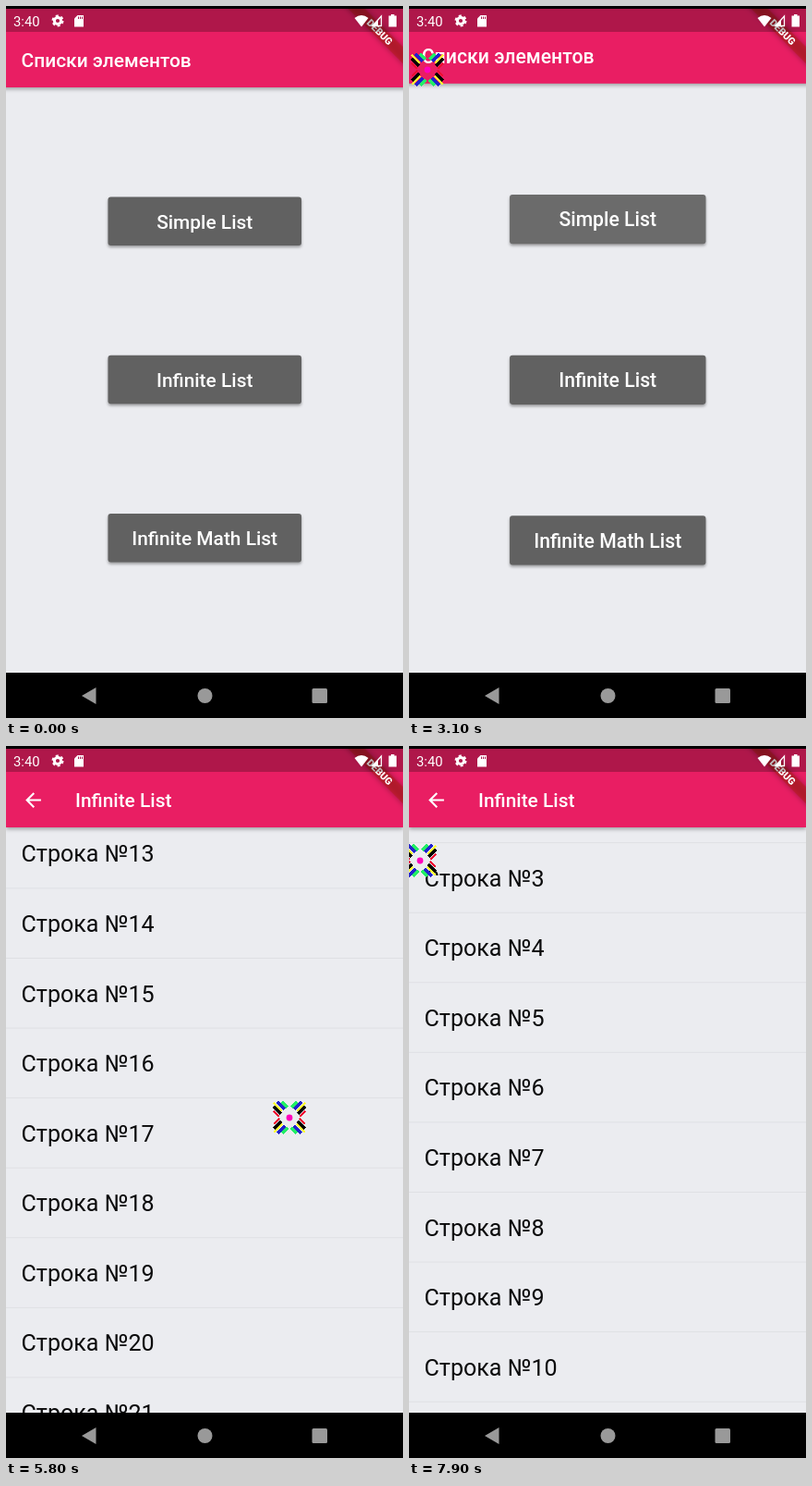
Recreate the animation shown at these times as an HTML page. Size 430 by 770 pixels, loop 8000 ms.

```html
<!DOCTYPE html>
<html lang="ru">
<head>
<meta charset="utf-8">
<title>Списки элементов</title>
<style>
html, body { margin: 0; width: 100%; height: 100%; overflow: hidden; background: #000; }
svg { display: block; width: 430px; height: 770px; font-family: Roboto, sans-serif; }
.title, .label { font-size: 20.9px; font-weight: 500; fill: #fff; }
.label { text-anchor: middle; }
.row { font-size: 25.08px; fill: #0b0b0c; }
.bar { fill: #e91e63; filter: drop-shadow(0 2px 2px rgba(0,0,0,.32)); }
.button { fill: #616161; filter: drop-shadow(0 2px 1.5px rgba(0,0,0,.35)); }
.page { transform-origin: 215px 387px; }
</style>
</head>
<body>
<svg viewBox="0 0 430 770">
  <defs>
    <clipPath id="body"><rect y="88" width="430" height="633"/></clipPath>
    <g id="corner" fill="none" shape-rendering="crispEdges">
      <path d="M0 1L9 10" stroke="#ff3" stroke-width="2.5"/>
      <path d="M4 0L12 8" stroke="#22c" stroke-width="3"/>
      <path d="M9 0L15 6" stroke="#2e6" stroke-width="3"/>
      <path d="M0 5L8 13" stroke="#000" stroke-width="3.5"/>
      <path d="M0 10L6 16" stroke="#e13" stroke-width="2.5"/>
    </g>
  </defs>

  <g id="home" class="page">
    <rect y="3" width="430" height="718" fill="#ebecf0"/>
    <g id="buttons"></g>
    <rect class="bar" x="-6" y="-3" width="442" height="91"/>
    <text class="title" x="16.5" y="66">Списки элементов</text>
  </g>

  <g id="detail" class="page">
    <rect y="3" width="430" height="718" fill="#ebecf0"/>
    <g clip-path="url(#body)" id="rows"></g>
    <rect class="bar" x="0" y="3" width="430" height="85"/>
    <path transform="translate(17 46) scale(1.045)" fill="#fff" d="M20 11H7.83l5.59-5.59L12 4l-8 8 8 8 1.41-1.41L7.83 13H20z"/>
    <text class="title" x="75" y="66" id="heading"></text>
  </g>

  <g transform="translate(430 3) rotate(45)">
    <rect x="-50" y="29.3" width="100" height="12.5" fill="#b71c1c" fill-opacity=".63" style="filter:drop-shadow(0 0 3px rgba(0,0,0,.5))"/>
    <text y="39.4" text-anchor="middle" font-size="10.7" font-weight="900" fill="#fff">DEBUG</text>
  </g>
  <rect y="3" width="430" height="25" fill="#000" fill-opacity=".25"/>
  <rect width="430" height="3"/>
  <g fill="#fff">
    <text x="8" y="21.5" font-size="14.8">3:40</text>
    <circle cx="56" cy="16" r="3.6" fill="none" stroke="#fff" stroke-width="3"/>
    <circle cx="56" cy="16" r="5.5" fill="none" stroke="#fff" stroke-width="2" stroke-dasharray="3 2.76"/>
    <path d="M77.5 10H84v12.5H74V13.5z"/>
    <path d="M78 11.5h1v2.5h-1zM80 11.5h1v2.5h-1zM82 11.5h1v2.5h-1z" fill="#ad1750"/>
    <path d="M377.5 13Q385 7 392.5 13L385 22.5z"/>
    <path d="M397 21.5L406.5 11V21.5z" fill="none" stroke="#fff" stroke-width="1.3"/>
    <path d="M397 21.5L403 15V21.5z"/>
    <path d="M414.5 10.5H417V9H420.500V10.5H423V22.5H414.5z"/>
  </g>
  <rect y="721" width="430" height="49"/>
  <g fill="#999">
    <path d="M82 746L97.500 737V755z"/>
    <circle cx="215.500" cy="746" r="8"/>
    <rect x="331.500" y="738" width="16.500" height="16" rx="1.500"/>
  </g>

  <g id="cursor">
    <use href="#corner"/>
    <use href="#corner" transform="matrix(-1 0 0 1 34 0)"/>
    <use href="#corner" transform="matrix(1 0 0 -1 0 34)"/>
    <use href="#corner" transform="matrix(-1 0 0 -1 34 34)"/>
    <circle cx="17" cy="17" r="3.4" fill="#f0b"/>
  </g>
</svg>
<script>
const LOOP = 8000, STEP = 100, PITCH = 75.57;
const $ = id => document.getElementById(id);
const clamp = v => Math.max(0, Math.min(1, v));

function add(parent, tag, attrs, text = '') {
  const node = document.createElementNS('http://www.w3.org/2000/svg', tag);
  for (const key in attrs) node.setAttribute(key, attrs[key]);
  node.textContent = text;
  return parent.appendChild(node);
}

const buttons = ['Simple List', 'Infinite List', 'Infinite Math List'].map((name, i) => {
  const y = 206.5 + i * 171.3;
  const box = add($('buttons'), 'rect', { class: 'button', x: 110.5, y, width: 209.5, height: 52.5, rx: 3 });
  add($('buttons'), 'text', { class: 'label', x: 215.2, y: y + 34 }, name);
  return box;
});

const rows = Array.from({ length: 10 }, () => ({
  text: add($('rows'), 'text', { class: 'row', x: 16.5 }),
  line: add($('rows'), 'rect', { width: 430, height: 1, fill: '#dfe0e4' })
}));

// Keys are [time, ...values].
const cursorPath = [
  [700, 450, 330], [1300, 238.5, 223.5], [1900, 238.5, 223.5], [2400, 230, 243],
  [2700, 19.5, 68.5], [3100, 19.5, 68.5], [3600, 240, 405], [3900, 240, 405],
  [4300, 327, 441], [4700, 335, 600], [5000, 318, 380], [5300, 330, 600],
  [5800, 306.5, 402], [6200, 300, 560], [6600, 272, 285.5], [6800, 268, 290],
  [7100, 285, 520], [7500, 281, 300], [7900, 11.5, 124]
];
const scrollPath = [
  [4700, 0], [5000, 230], [5300, 450], [5800, 983], [6200, 1380], [6600, 1898],
  [6700, 1898], [7100, 1000], [7400, 360], [7500, 249], [7600, 201]
];
const smooth = p => p * p * (3 - 2 * p);

function sample(keys, t, ease = p => p) {
  const next = keys.findIndex(key => key[0] > t);
  if (next === 0) return keys[0].slice(1);
  if (next < 0) return keys[keys.length - 1].slice(1);
  const a = keys[next - 1], b = keys[next];
  const p = ease((t - a[0]) / (b[0] - a[0]));
  return a.slice(1).map((v, i) => v + (b[i + 1] - v) * p);
}

function drawRows(simple, offset) {
  const first = simple ? 0 : Math.max(0, Math.floor(offset / PITCH) - 1);
  rows.forEach(({ text, line }, k) => {
    const i = first + k, y = 126 + i * PITCH - offset;
    const shown = !simple || i < 3;
    text.textContent = !shown ? '' : simple ? ['0000', '0001', '0010'][i] : 'Строка №' + i;
    text.setAttribute('y', y);
    line.setAttribute('y', y + 28);
    line.setAttribute('visibility', shown ? 'inherit' : 'hidden');
  });
}

function setPage(page, scale, opacity) {
  page.style.transform = `scale(${scale})`;
  page.style.opacity = opacity;
  page.style.visibility = opacity > 0 ? 'visible' : 'hidden';
}

function pageTransition(t) {
  const popping = t >= 3000 && t < 3700;
  const start = popping ? 3000 : t < 3000 ? 1500 : 3800;
  const p = clamp((t - start) / 300), rest = (1 - p) ** 3;
  if (popping) {
    setPage($('home'), 1 + .047 * rest, 1);
    setPage($('detail'), .9 + .1 * rest, clamp(1 - 3 * p));
  } else {
    setPage($('home'), 1 + .05 * (1 - rest), 1);
    setPage($('detail'), 1 - .15 * rest, clamp(3 * p));
  }
}

function draw(t) {
  const simple = t < 3500;
  $('heading').textContent = simple ? 'Simple List' : 'Infinite List';
  drawRows(simple, simple ? 0 : sample(scrollPath, t)[0]);
  pageTransition(t);
  buttons[0].style.fill = t >= 1500 && t < 3200 ? '#6b6b6b' : '';
  buttons[1].style.fill = t >= 3800 ? '#6b6b6b' : '';
  const [x, y] = sample(cursorPath, t, smooth);
  $('cursor').setAttribute('transform', `translate(${Math.round(x - 17)} ${Math.round(y - 17)})`);
}

const began = performance.now();
function tick() {
  const t = (performance.now() - began) % LOOP;
  draw(Math.floor(t / STEP) * STEP);
  requestAnimationFrame(tick);
}
tick();
</script>
</body>
</html>
```
